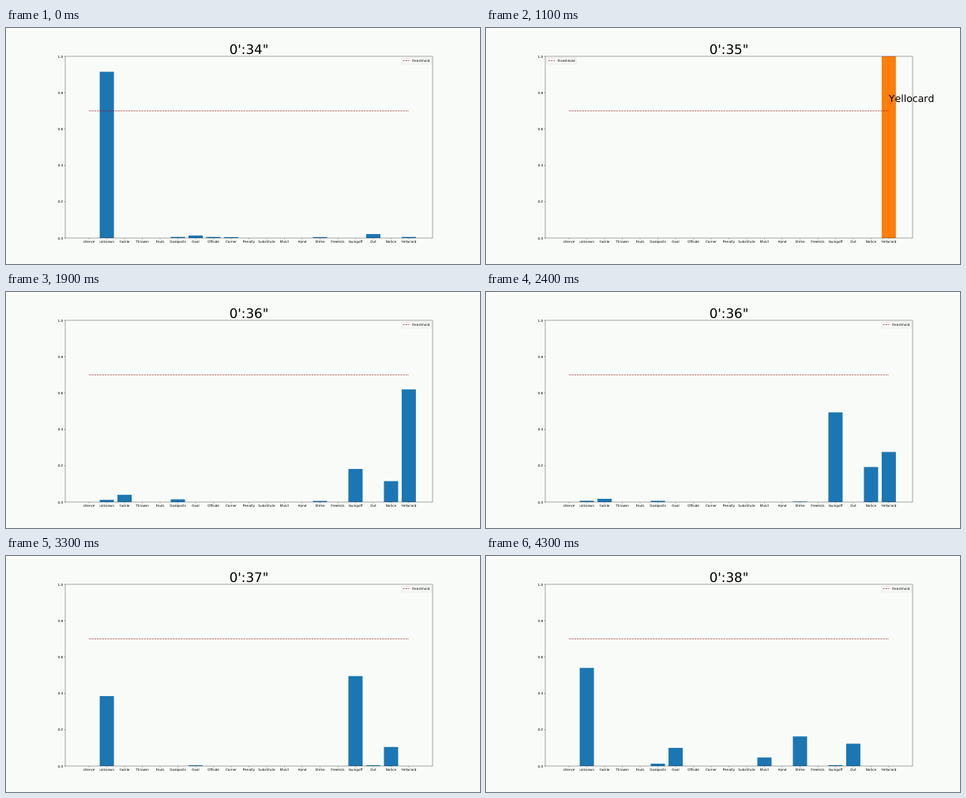
Recreate the animation shown at these times as an HTML page. Size 600 by 300 pixels, loop 4400 ms.

```html
<!DOCTYPE html>
<html lang="en">
<head>
<meta charset="utf-8">
<title>Event probabilities</title>
<style>
  html, body { margin: 0; width: 100%; height: 100%; overflow: hidden; background: #f9fbf8; }
  svg { display: block; width: 600px; height: 300px; }
  text {
    font-family: "DejaVu Sans", sans-serif;
    font-kerning: none;
    text-rendering: geometricPrecision;
  }
</style>
</head>
<body>
<svg id="chart" viewBox="0 0 600 300"></svg>
<script>
const LOOP = 4400;
const PT = 300 / 720; // one typographic point on a 10 inch high figure
const AXES = { left: 75, right: 540, top: 36, bottom: 267 };
const THRESHOLD = 0.7;
const NAMES = ["silence", "unknown", "tackle", "Throwin", "Fouls", "Goalposts", "Goal",
  "Offside", "Corner", "Penalty", "Substitute", "Mulct", "Hand", "Strike", "Freekick",
  "layingoff", "Out", "Notice", "Yellocard"];

// Key poses; bars that are not named rest at zero.
const POSES = [
  { at: 0, unknown: .915, Goalposts: .006, Goal: .014, Offside: .006, Corner: .005, Strike: .005, Out: .022, Yellocard: .006 },
  { at: 500, unknown: .473, Goalposts: .004, Goal: .015, Offside: .008, Corner: .005, Out: .023, Yellocard: .457 },
  { at: 1100, Yellocard: 1 },
  { at: 1300, Yellocard: 1 },
  { at: 1900, unknown: .012, tackle: .04, Goalposts: .015, Strike: .006, layingoff: .182, Notice: .115, Yellocard: .62 },
  { at: 2800, unknown: .003, layingoff: .742, Notice: .255 },
  { at: 3300, unknown: .385, Goal: .004, layingoff: .495, Out: .004, Notice: .105 },
  { at: 4100, unknown: .658, Goal: .08, Mulct: .03, Strike: .12, Out: .1 },
  { at: 4300, unknown: .54, Goalposts: .013, Goal: .1, Mulct: .047, Strike: .163, layingoff: .005, Out: .123 }
];

const unit = (AXES.right - AXES.left) / 20.68;
const xOf = i => AXES.left + (i + 1.34) * unit;
const yOf = v => AXES.bottom - v * (AXES.bottom - AXES.top);

function add(parent, tag, attrs, content = "") {
  const node = document.createElementNS("http://www.w3.org/2000/svg", tag);
  for (const key in attrs) node.setAttribute(key, attrs[key]);
  node.textContent = content;
  return parent.appendChild(node);
}
const line = (parent, x1, y1, x2, y2, attrs) =>
  add(parent, "line", { x1, y1, x2, y2, stroke: "#000", "stroke-width": .8 * PT, ...attrs });
const label = (parent, x, y, points, anchor, content) =>
  add(parent, "text", { x, y, "font-size": points * PT, "text-anchor": anchor }, content);

const chart = document.getElementById("chart");
const dashed = {
  stroke: "#960a12", "stroke-width": 1.5 * PT,
  "stroke-dasharray": `${5.55 * PT} ${2.4 * PT}`
};

const bars = NAMES.map((name, i) =>
  add(chart, "rect", { x: xOf(i) - .4 * unit, width: .8 * unit }));
line(chart, xOf(0), yOf(THRESHOLD), xOf(18), yOf(THRESHOLD), dashed);

NAMES.forEach((name, i) => {
  line(chart, xOf(i), AXES.bottom, xOf(i), AXES.bottom + 3.5 * PT);
  label(chart, xOf(i), AXES.bottom + 14.6 * PT, 10, "middle", name);
});
for (let i = 0; i <= 5; i++) {
  const y = yOf(i / 5);
  line(chart, AXES.left - 3.5 * PT, y, AXES.left, y);
  label(chart, AXES.left - 7 * PT, y + 3.65 * PT, 10, "end", (i / 5).toFixed(1));
}
add(chart, "rect", {
  x: AXES.left, y: AXES.top, width: AXES.right - AXES.left, height: AXES.bottom - AXES.top,
  fill: "none", stroke: "#000", "stroke-width": .8 * PT
});

const title = label(chart, (AXES.left + AXES.right) / 2, AXES.top - 3, 40, "middle");
const callout = label(chart, 0, yOf(.75), 30, "start");

const legendWidth = 37.36;
const legend = add(chart, "g", {});
add(legend, "rect", {
  width: legendWidth, height: 7.7, rx: 2 * PT, fill: "#f9fbf8", stroke: "#ccc",
  "stroke-width": PT, opacity: .8
});
line(legend, 4 * PT, 3.5, 24 * PT, 3.5, dashed);
label(legend, 32 * PT, 4.95, 10, "start", "threshhold");

// Straight blend between the two poses around time t.
function reader(t) {
  const next = POSES.find(pose => pose.at > t) || POSES.at(-1);
  const last = POSES.findLast(pose => pose.at <= t);
  const mix = next === last ? 0 : (t - last.at) / (next.at - last.at);
  return name => (last[name] || 0) * (1 - mix) + (next[name] || 0) * mix;
}

function draw(time) {
  // The reading updates every 100 ms and skips one update in five.
  let step = Math.floor(time % LOOP / 100);
  if (step % 5 === 2) step--;
  const t = step * 100;
  const valueOf = reader(t);

  let detected = -1;
  NAMES.forEach((name, i) => {
    const value = valueOf(name);
    const hit = value > THRESHOLD && name !== "unknown";
    if (hit) detected = i;
    bars[i].setAttribute("y", yOf(value));
    bars[i].setAttribute("height", AXES.bottom - yOf(value));
    bars[i].setAttribute("fill", hit ? "#fd7e0b" : "#1c76b2");
  });
  callout.textContent = detected < 0 ? "" : NAMES[detected];
  callout.setAttribute("x", xOf(Math.max(detected, 0)));
  title.textContent = `0':${34 + Math.floor((t + 200) / 1000)}"`;

  // The legend moves aside when a bar reaches it.
  const covered = valueOf("Yellocard") > .955;
  const legendX = covered ? AXES.left + 5 * PT : AXES.right - 5 * PT - legendWidth;
  legend.setAttribute("transform", `translate(${legendX} ${AXES.top + 5 * PT})`);
}

const start = performance.now();
function frame() {
  draw(performance.now() - start);
  requestAnimationFrame(frame);
}
frame();
</script>
</body>
</html>
```
